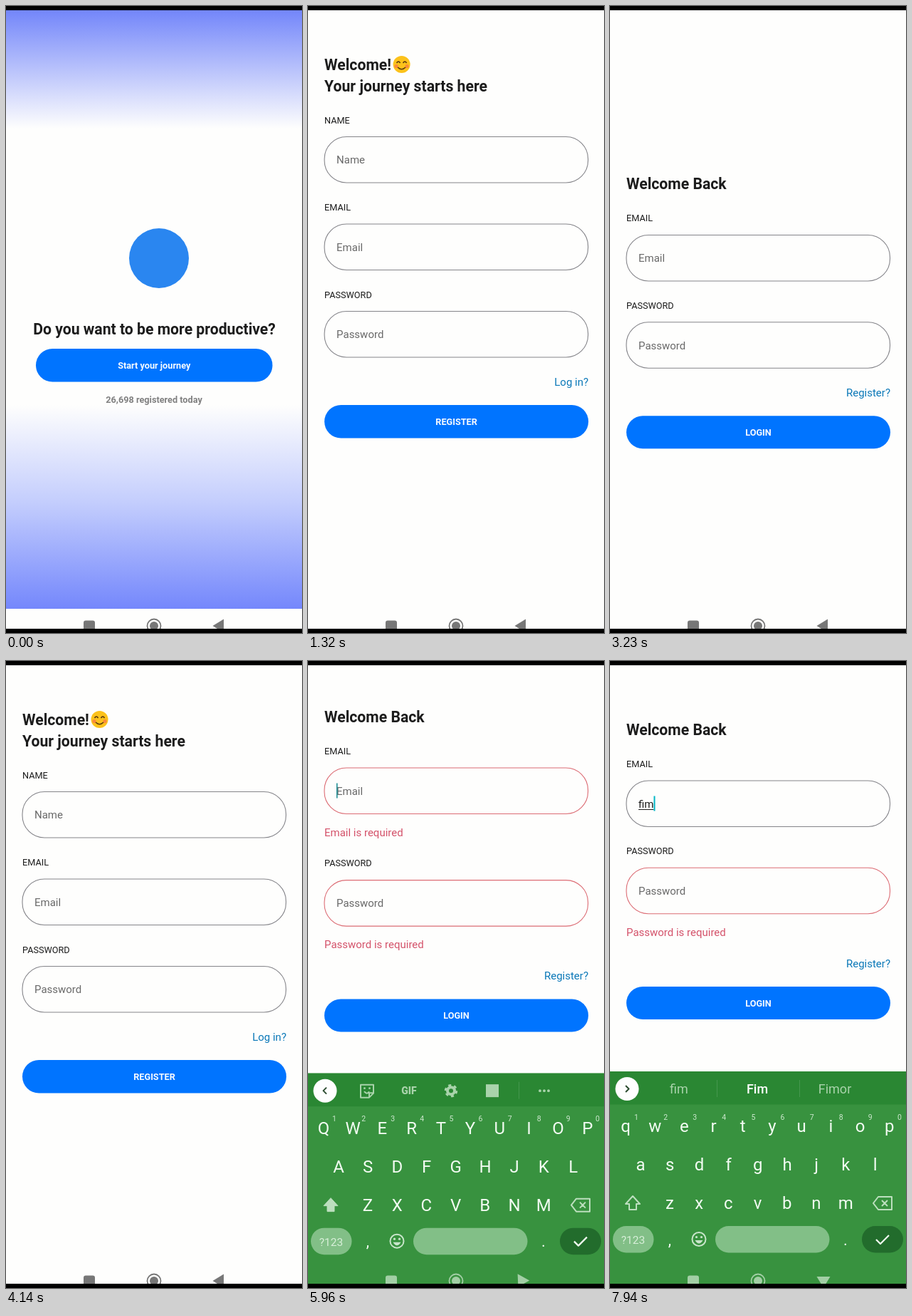
These frames come from a looping animation (416 by 880 pixels, 7990 ms). An HTML page:

```html
<!DOCTYPE html>
<html lang="en">
<head>
<meta charset="utf-8">
<title>Sign-up flow</title>
<style>
  html, body { margin: 0; width: 100%; height: 100%; overflow: hidden; background: #fefefd; }
  svg { display: block; width: 416px; height: 880px; font-family: Roboto, sans-serif; }
</style>
</head>
<body>
<svg id="stage" viewBox="0 0 416 880"></svg>
<script>
const LOOP = 7990;
const PAPER = "#fefefd", INK = "#1c1c1c", MUTED = "#696969", BLUE = "#0074ff";
const LINK = "#0a78b8", BORDER = "#85858a", ERROR = "#d4526a", ERROR_BORDER = "#dc6c74";
const PALE = "#a9d3ab", KEY = "#f2fbf2";

const ERRORS_AT = 5200, FOCUS_AT = 5730, LOWERCASE_AT = 6500;
const TYPED_AT = [7000, 7300, 7650];
const WORD = "fim", FULL_NAME = "Fimor";

const stage = document.getElementById("stage");
const measure = document.createElement("canvas").getContext("2d");
const clamp = v => Math.max(0, Math.min(1, v));
const progress = (t, start, duration) => clamp((t - start) / duration);

// Drawing helpers; text is placed by the middle of its capitals.
const text = (x, y, str, size, fill, anchor = "start", weight = 400) =>
  `<text x="${x}" y="${y + size * 0.355}" font-size="${size}" fill="${fill}" text-anchor="${anchor}" font-weight="${weight}">${str}</text>`;
const rect = (x, y, w, h, fill, r = 0, extra = "") =>
  `<rect x="${x}" y="${y}" width="${w}" height="${h}" rx="${r}" fill="${fill}" ${extra}/>`;
const circle = (x, y, r, fill, extra = "") =>
  `<circle cx="${x}" cy="${y}" r="${r}" fill="${fill}" ${extra}/>`;
const line = (d, stroke, width = 2, fill = "none") =>
  `<path d="${d}" stroke="${stroke}" stroke-width="${width}" fill="${fill}" stroke-linejoin="round"/>`;
const group = (x, y, content, extra = "") => `<g transform="translate(${x} ${y})" ${extra}>${content}</g>`;

const heading = (y, str) => text(23, y, str, 21.2, INK, "start", 700);
const label = (y, str) => text(23, y, str, 12.7, INK);
const button = (x, y, w, h, str) =>
  rect(x, y, w, h, BLUE, h / 2) + text(x + w / 2, y + h / 2 + 0.5, str, 12.7, "#f6faff", "middle", 700);
const fieldBox = (y, stroke) =>
  rect(23, y + 0.5, 370.5, 64.5, "none", 31, `stroke="${stroke}" stroke-width="1.1"`);
const field = (y, name, stroke = BORDER) => fieldBox(y, stroke) + text(40, y + 33, name, 15, MUTED);

const gradient = (id, y1, y2, stops) =>
  `<linearGradient id="${id}" gradientUnits="userSpaceOnUse" x1="0" x2="0" y1="${y1}" y2="${y2}">` +
  stops.map(([y, color]) => `<stop offset="${(y - y1) / (y2 - y1)}" stop-color="${color}"/>`).join("") +
  "</linearGradient>";

function welcomePage() {
  return gradient("top", 6, 172, [[6, "#7386fa"], [172, PAPER]]) +
    gradient("bottom", 560, 846, [[560, PAPER], [700, "#c2ccfd"], [846, "#7487fc"]]) +
    rect(0, 6, 416, 166, "url(#top)") + rect(0, 560, 416, 286, "url(#bottom)") +
    circle(215, 354, 42, "#2a86f0") +
    text(208.5, 453, "Do you want to be more productive?", 21.2, INK, "middle", 700) +
    button(42, 481, 332.5, 46.5, "Start your journey") +
    text(208, 552, "26,698 registered today", 12.7, "#808080", "middle", 700);
}

function smiley(x, y) {
  return group(x, y, circle(0, 0, 12, "#fcc21b") +
    circle(-7.5, 2.5, 2.6, "#f98a3c") + circle(7.5, 2.5, 2.6, "#f98a3c") +
    line("M-7-2q2.5-4 5 0M2-2q2.5-4 5 0M-5.5 4q5.5 5.5 11 0", "#5a3a10", 1.6));
}

function registerPage() {
  return heading(82, "Welcome!") + smiley(131.5, 82) + heading(112, "Your journey starts here") +
    ["Name", "Email", "Password"].map((name, i) =>
      label(160 + i * 122.5, name.toUpperCase()) + field(183 + i * 122.5, name)).join("") +
    text(394, 527.5, "Log in?", 15, LINK, "end") + button(23, 560, 371, 46.5, "REGISTER");
}

const typedText = t => WORD.slice(0, TYPED_AT.filter(at => t >= at).length);

function emailInput(t, y, stroke) {
  const typed = typedText(t);
  measure.font = "15px Roboto, sans-serif";
  const width = measure.measureText(typed).width;
  const lastEdit = Math.max(...[FOCUS_AT, ...TYPED_AT].filter(at => t >= at));
  const cursorOn = t >= FOCUS_AT && (t - lastEdit) % 1000 < 500;
  const value = typed
    ? fieldBox(y, stroke) + text(40, y + 33, typed, 15, INK) + rect(40, y + 40.5, width, 1, INK)
    : field(y, "Email", stroke);
  return value + (cursorOn ? rect(40 + width, y + 22, typed ? 2 : 1.5, 21, typed ? "#00b6c6" : "#158a90") : "");
}

function loginPage(t) {
  const emailError = t >= ERRORS_AT && !typedText(t);
  const passwordError = t >= ERRORS_AT;
  const centre = t >= FOCUS_AT ? 114 : 249.5;
  let y = centre - 18 * (emailError + passwordError);
  let out = heading(y, "Welcome Back");
  const section = (name, hasError, draw) => {
    out += label(y, name.toUpperCase()) + draw(y + 23.3, hasError ? ERROR_BORDER : BORDER);
    y += 88.3;
    if (hasError) out += text(23, y + 26, `${name} is required`, 15, ERROR);
    y += hasError ? 69.3 : 34;
  };
  y += 48.2;
  section("Email", emailError, (top, stroke) => emailInput(t, top, stroke));
  section("Password", passwordError, (top, stroke) => field(top, "Password", stroke));
  return out + text(394, y + 0.5, "Register?", 15, LINK, "end") + button(23, y + 33, 371, 46, "LOGIN");
}

// Screen change: a fast start and a long, slow settle, in two Bezier pieces.
function settle(x) {
  if (x >= 1) return 1;
  const cubic = (a, b, c, d, u) =>
    a * (1 - u) ** 3 + 3 * b * u * (1 - u) ** 2 + 3 * c * u * u * (1 - u) + d * u ** 3;
  const [xs, ys] = x < 1 / 6
    ? [[0, 0.05, 0.1333, 1 / 6], [0, 0, 0.06, 0.4]]
    : [[1 / 6, 0.2083, 0.25, 1], [0.4, 0.82, 1, 1]];
  let low = 0, high = 1;
  for (let i = 0; i < 20; i++) {
    const mid = (low + high) / 2;
    if (cubic(...xs, mid) < x) low = mid; else high = mid;
  }
  return cubic(...ys, low);
}

const VISITS = [[-1000, welcomePage], [930, registerPage], [2397, loginPage], [3680, registerPage], [4560, loginPage]];

function pages(t) {
  const index = VISITS.findLastIndex(([start]) => t >= start);
  const [start, current] = VISITS[index];
  const age = t - start, moved = settle(clamp(age / 450)), slide = 41.6;
  const page = (draw, x, opacity) =>
    group(x, 0, rect(0, 6, 416, 840, PAPER) + draw(t), `opacity="${opacity}"`);
  const leaving = 1 - progress(age, 75, 200);
  return page(current, slide * (1 - moved), progress(age, 50, 83)) +
    (index && leaving > 0 ? page(VISITS[index - 1][1], -slide * moved, leaving) : "");
}

function navigation(t) {
  const open = t >= FOCUS_AT + 100;
  const color = open ? "#a2cfa5" : "#777777";
  const turn = -90 * progress(t, 5890, 105);
  return rect(109, 862.5, 16, 16, color, 3) +
    circle(208, 870, 9.5, "none", `stroke="${color}" stroke-width="1.8"`) + circle(208, 870, 6, color) +
    group(300, 870, `<path d="M-9.5 0L6-9.5V9.5Z" fill="${color}" transform="rotate(${turn})"/>`);
}

function toolbar(typed) {
  const y = 24.5;
  const chevron = typed ? "M22 20l4.5 4.5-4.5 4.5" : "M26 20l-4.5 4.5 4.5 4.5";
  const start = circle(24, y, 16.5, "#fefefe") + line(chevron, "#2c4c30", 2);
  const divider = x => rect(x, 12, 1, 24, "#45974e");
  if (typed) {
    const capital = typed[0].toUpperCase() + typed.slice(1);
    return start + divider(150) + divider(266) + text(97, y, typed, 18, PALE, "middle") +
      text(207, y, capital, 18, "#ffffff", "middle", 500) + text(316, y, FULL_NAME, 18, PALE, "middle");
  }
  const sticker = line("M-9-8.5h18v12l-6 6h-12zM9 3h-6v6.5M-4 1q4 5 7 0", PALE, 2) +
    circle(-3.5, -3.5, 1.4, PALE) + circle(3.5, -3.5, 1.4, PALE);
  const gear = circle(0, 0, 5, "none", `stroke="${PALE}" stroke-width="4"`) +
    circle(0, 0, 7.7, "none", `stroke="${PALE}" stroke-width="3" stroke-dasharray="4.03"`);
  return start + group(83, y, sticker) + text(142, y, "GIF", 14, PALE, "middle", 900) +
    group(201, y, gear) + rect(250, y - 9, 18, 18, PALE) + divider(296) +
    [326, 332, 338].map(x => circle(x, y, 1.9, PALE)).join("");
}

function keyboard(t) {
  if (t < FOCUS_AT) return "";
  const top = 576 + 298 * (1 - progress(t, FOCUS_AT, 255)) ** 2;
  const lower = t >= LOWERCASE_AT;
  const row = (letters, x, baseline) => [...letters].map((key, i) =>
    text(x + i * 41.2, baseline - 8.5, lower ? key.toLowerCase() : key, 24, KEY, "middle")).join("");
  const numbers = [..."1234567890"].map((n, i) => text(37 + i * 41.1, 64, n, 10.5, "#cde8ce", "middle")).join("");
  const shift = line("M0-10L10 1H5V9H-5V1H-10Z", "#bcdfbe", lower ? 2 : 1, lower ? "none" : "#bcdfbe");
  const backspace = line("M-13 0L-6-9H13V9H-6ZM-1-4L7 4M7-4L-1 4", "#bcdfbe", 2);
  const emoji = circle(0, 0, 9.5, "none", `stroke="#c8e5ca" stroke-width="2"`) +
    circle(-3.5, -3, 1.6, "#c8e5ca") + circle(3.5, -3, 1.6, "#c8e5ca") + `<path d="M-5.5 1.5h11q-5.5 9-11 0" fill="#c8e5ca"/>`;
  return group(0, top,
    rect(0, 0, 416, 310, "#38923f") + rect(0, 0, 416, 46.5, "#2a8733") + toolbar(typedText(t)) +
    row("QWERTYUIOP", 22, 85) + numbers + row("ASDFGHJKL", 43, 139) + row("ZXCVBNM", 84, 193) +
    group(32, 185, shift) + group(383, 185, backspace) +
    rect(4, 217, 57.5, 37.5, "#82bf87", 18.7) + text(32.5, 236.5, "?123", 15.5, "#d8efd9", "middle") +
    text(84, 236, ",", 22, KEY, "middle") + group(125, 235.5, emoji) +
    rect(148, 217, 160.5, 37.5, "#82bf87", 18.7) + text(331, 236, ".", 22, KEY, "middle") +
    rect(354, 217, 58, 37.5, "#226c2c", 18.7) + line("M374 236l6 6 12-12", KEY, 2.2));
}

function draw(now) {
  const t = now % LOOP;
  stage.innerHTML = rect(0, 0, 416, 880, PAPER) + pages(t) + rect(0, 846, 416, 28, PAPER) +
    keyboard(t) + navigation(t) + rect(0, 0, 416, 6, "#000") + rect(0, 874, 416, 6, "#000");
  requestAnimationFrame(() => draw(performance.now() - begin));
}

const begin = performance.now();
draw(0);
</script>
</body>
</html>
```
